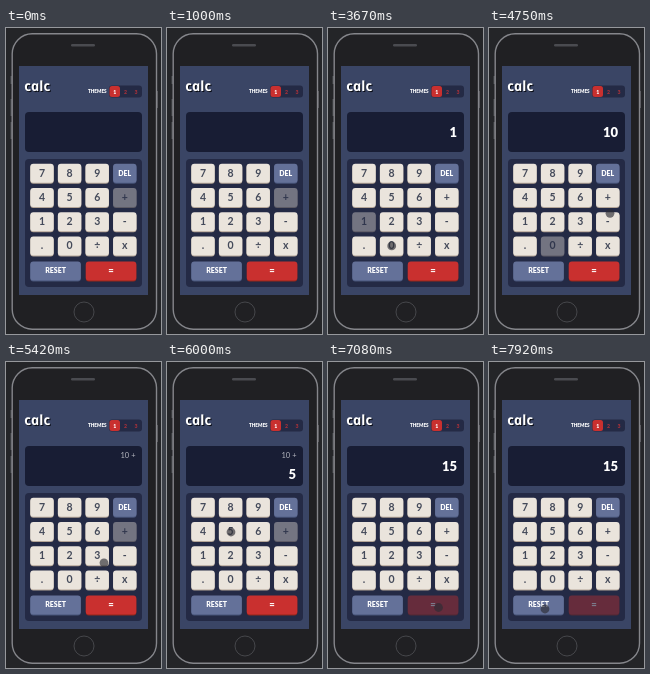
These frames come from a looping animation (155 px wide and 306 px high, 8000 ms). An HTML page:

```html
<!DOCTYPE html>
<html lang="en">
<head>
<meta charset="utf-8">
<title>calc</title>
<style>
  html, body { margin: 0; width: 100%; height: 100%; overflow: hidden; background: #242528; }
  svg { display: block; width: 100vw; height: 100vh; }
  text { font-family: Lato, "Open Sans", sans-serif; font-weight: 900; fill: #fff; }
  .mid { text-anchor: middle; }
  .end { text-anchor: end; }
  .logo { font: italic 700 14px "Open Sans", sans-serif; }
</style>
</head>
<body>
<svg viewBox="0 0 155 306">
  <path d="M5.2 48v8M5.2 71v17M5.2 94v17M151.2 63v17" stroke="#6c6d72"/>
  <rect x="6.2" y="5.8" width="144.3" height="295.4" rx="20" fill="#202023" stroke="#85868b" stroke-width="1.4"/>
  <rect x="65" y="16" width="24" height="2.4" rx="1.2" fill="#4a4b50"/>
  <circle cx="78" cy="284" r="10" fill="none" stroke="#46474b"/>
  <rect x="13" y="38" width="129" height="229" fill="#3a4565"/>
  <g transform="translate(19 62.6) skewX(12)">
    <text class="logo" x=".8" y="1" style="fill:#080b14">calc</text>
    <text class="logo">calc</text>
  </g>
  <text x="82" y="65" font-size="4.6">THEMES</text>
  <rect x="103" y="57.5" width="33" height="12" rx="3" fill="#242a45"/>
  <rect x="103.5" y="58" width="10.5" height="11" rx="2.5" fill="#c9302f"/>
  <g class="mid" font-size="5.2">
    <text x="108.7" y="65.5">1</text>
    <text x="119.5" y="65.5" style="fill:#a5313a">2</text>
    <text x="130" y="65.5" style="fill:#a5313a">3</text>
  </g>
  <rect x="19" y="84" width="117" height="40" rx="4" fill="#181d34"/>
  <text id="upper" class="end" x="129.5" y="95.5" font-size="7.5" style="fill:#b4b6bf;font-weight:400"></text>
  <text id="lower" class="end" x="129" font-size="13"></text>
  <rect x="19" y="131" width="117" height="128" rx="4" fill="#242a45"/>
  <g id="keys"></g>
  <circle id="cursor" r="4.4" fill="#2c2d34" fill-opacity=".65"/>
</svg>
<script>
const LOOP = 8000, FADE = 200;
const $ = id => document.getElementById(id);
const keys = {};

function addKey(label, x, y, w, face, edge, ink, size, weight) {
  const g = document.createElementNS('http://www.w3.org/2000/svg', 'g');
  g.innerHTML = `<rect x="${x}" y="${y + 1}" width="${w}" height="19" rx="3" fill="${edge}"/>
    <rect x="${x}" y="${y}" width="${w}" height="19" rx="3" fill="${face}"/>
    <text class="mid" x="${x + w / 2}" y="${y + 9.2 + size * .36}" font-size="${size}" style="fill:${ink};font-weight:${weight}">${label}</text>`;
  $('keys').append(g);
  keys[label] = g;
}

const addBlueKey = (label, x, y, w) => addKey(label, x, y, w, '#647199', '#475479', '#fff', 7, 900);

['7', '8', '9', 'DEL', '4', '5', '6', '+', '1', '2', '3', '-', '.', '0', '÷', 'x'].forEach((label, i) => {
  const x = 24.3 + i % 4 * 27.6, y = 135.8 + Math.floor(i / 4) * 24.2;
  if (label === 'DEL') addBlueKey(label, x, y, 23.4);
  else addKey(label, x, y, 23.4, '#eae4dc', '#b4a597', '#444a5a', 10.5, 700);
});
addBlueKey('RESET', 24.3, 233.5, 50.5);
addKey('=', 79.8, 233.5, 50.5, '#c9302f', '#93261a', '#fff', 9.5, 900);

// time, pressed key, upper line, lower line
const presses = [
  [-FADE, '+', '', ''],
  [3290, '1', '', '1'],
  [3830, '0', '', '10'],
  [5080, '+', '10 +', ''],
  [6000, '5', '10 +', '5'],
  [6830, '=', '', '15']
];

// start, end, control point, end point of each cursor move
const home = [-8, 243];
const moves = [
  [2130, 2920, [30, 233], [72, 162]],
  [2920, 3250, [50, 165], [37, 194]],
  [3300, 3690, [42, 250], [64, 217.5]],
  [3880, 4500, [90, 235], [121, 196]],
  [4600, 4930, [121, 184], [121, 171]],
  [5160, 5830, [84, 238], [64, 170]],
  [6060, 6500, [85, 225], [110.5, 245.5]],
  [7450, 7910, [95, 158], [56, 247]]
];

const clamp = v => Math.min(1, Math.max(0, v));
const smooth = u => u * u * (3 - 2 * u);

function cursorAt(t) {
  let from = home;
  for (const [start, end, ctrl, to] of moves) {
    if (t < start) break;
    const s = smooth(clamp((t - start) / (end - start))), a = from;
    from = [0, 1].map(k => (1 - s) ** 2 * a[k] + 2 * s * (1 - s) * ctrl[k] + s * s * to[k]);
  }
  return from;
}

function draw(t) {
  const n = presses.findLastIndex(p => t >= p[0]);
  const [time, active, upper, lower] = presses[n];
  const previous = n ? presses[n - 1][1] : '';
  const fade = clamp((t - time) / FADE);
  for (const label in keys) {
    const dim = label === active ? fade : label === previous ? 1 - fade : 0;
    keys[label].setAttribute('opacity', 1 - .6 * dim);
  }
  $('upper').textContent = upper;
  $('lower').textContent = lower;
  $('lower').setAttribute('y', upper ? 116.5 : 109);
  $('cursor').setAttribute('transform', `translate(${cursorAt(t)})`);
}

function tick() {
  draw(performance.now() % LOOP);
  requestAnimationFrame(tick);
}
tick();
</script>
</body>
</html>
```
